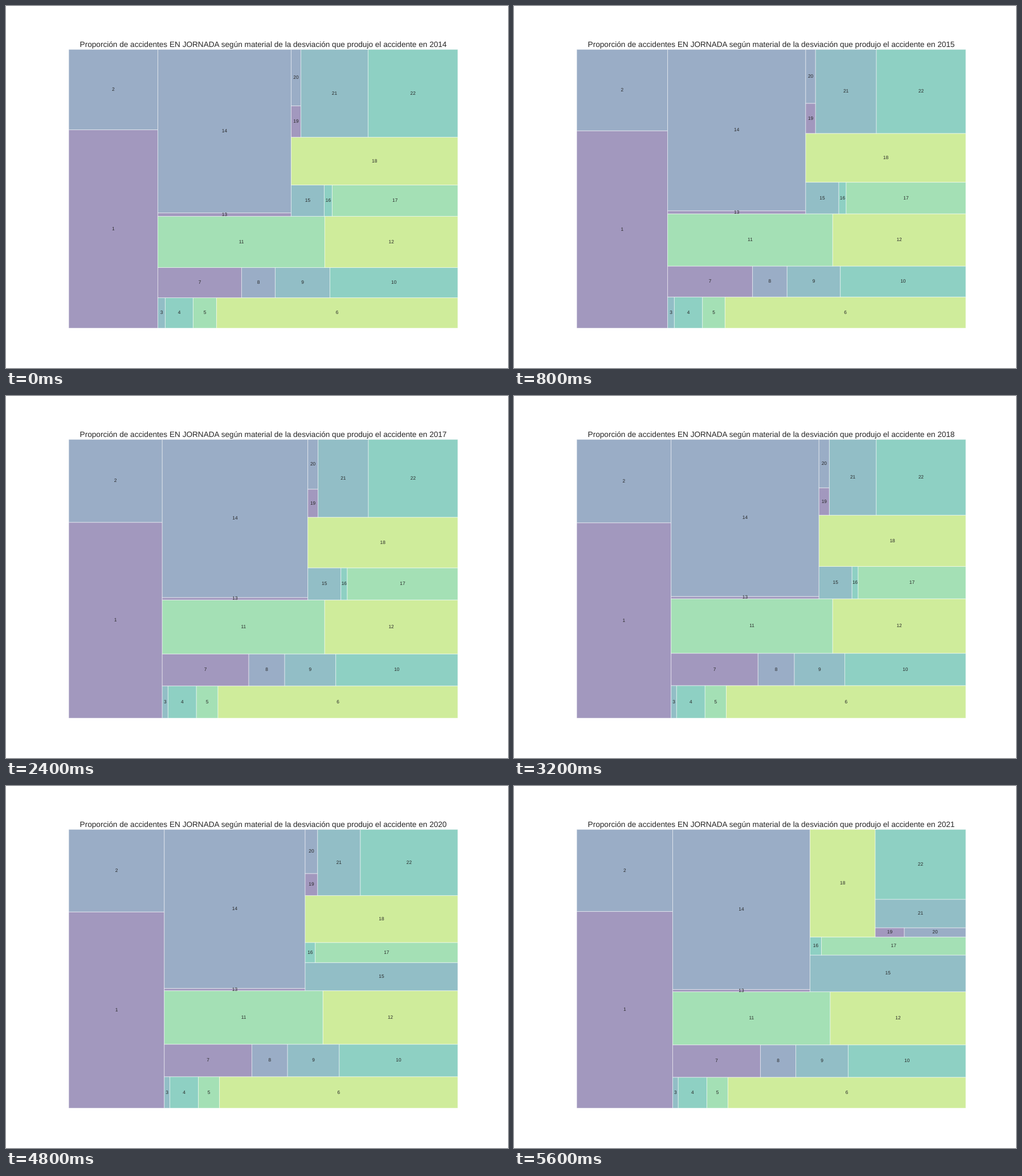
These frames come from a looping animation (881 px wide and 636 px high, 6.4 s). An HTML page:

```html
<!DOCTYPE html>
<html lang="es">
<head>
<meta charset="utf-8">
<title>Accidentes en jornada</title>
<style>
  html, body { margin: 0; width: 100%; height: 100%; overflow: hidden; background: #fff; }
  svg { display: block; }
  rect { fill-opacity: .5; stroke: #fff; stroke-opacity: .5; stroke-width: 1.05px; }
  text {
    font: 8.37px "Liberation Sans", Arial, sans-serif;
    fill: #262626; text-anchor: middle; text-rendering: geometricPrecision;
  }
  .title { font-size: 13.61px; }
  .year { visibility: hidden; animation: show 6.4s step-end infinite; }
  @keyframes show {
    0% { visibility: visible; }
    12.5%, 100% { visibility: hidden; }
  }
</style>
</head>
<body>
<svg id="stage" width="881" height="636" viewBox="0 0 881 636"></svg>
<script>
const COLORS = ['#46327e', '#365c8d', '#277f8e', '#1fa187', '#4ac16d', '#a0da39'];
const PLOT = { left: 110.1, bottom: 566, width: 682.8, height: 489.7 };

// Percent share of each category in three key years
const KEYS = [2014, 2019, 2021];
const SHARES = [
  [16.3, 17.04, 17.4], [6.6, 7.29, 7.26],
  [.208, .163, .159], [.784, .86, .815], [.656, .636, .601], [6.775, 7.226, 6.779],
  [2.33, 2.609, 2.625], [.935, 1.091, 1.057], [1.522, 1.5, 1.568], [3.557, 3.608, 3.518],
  [7.887, 8.126, 7.707], [6.283, 6.708, 6.631],
  [.42, .313, .288], [20.1, 21.5, 20.27],
  [.954, .988, 5.274], [.23, .179, .19], [3.625, 3.183, 2.402], [7.345, 6.906, 6.472],
  [.28, .26, .249], [.504, .459, .526], [5.442, 3.124, 2.376], [7.259, 6.185, 5.831],
];

const sum = list => list.reduce((a, b) => a + b, 0);
const easeOut = t => 1 - (1 - t) ** 1.7;

function sharesIn(year) {
  const k = year < KEYS[1] ? 0 : 1;
  const t = easeOut((year - KEYS[k]) / (KEYS[k + 1] - KEYS[k]));
  return SHARES.map(s => s[k] + (s[k + 1] - s[k]) * t);
}

// Worst aspect ratio of a strip of areas laid along a side
function worst(areas, side) {
  const depth = sum(areas) / side;
  return Math.max(...areas.map(a => Math.max(a / depth ** 2, depth ** 2 / a)));
}

// Squarified treemap of a 100 by 100 square, y pointing up
function squarify(shares) {
  const total = sum(shares);
  const areas = shares.map(s => s / total * 1e4);
  const boxes = [];
  let x = 0, y = 0, dx = 100, dy = 100;
  while (boxes.length < areas.length) {
    const rest = areas.slice(boxes.length);
    const side = Math.min(dx, dy);
    let n = 1;
    while (n < rest.length && worst(rest.slice(0, n), side) >= worst(rest.slice(0, n + 1), side)) n++;
    const strip = rest.slice(0, n);
    const depth = sum(strip) / side;
    const upright = dx >= dy;
    let pos = 0;
    for (const area of strip) {
      const len = area / depth;
      boxes.push(upright ? [x, y + pos, depth, len] : [x + pos, y, len, depth]);
      pos += len;
    }
    if (upright) { x += depth; dx -= depth; }
    else { y += depth; dy -= depth; }
  }
  return boxes;
}

function toPlot([x, y, w, h]) {
  const sx = PLOT.width / 100, sy = PLOT.height / 100;
  return [PLOT.left + x * sx, PLOT.bottom - (y + h) * sy, w * sx, h * sy];
}

function drawYear(year, i) {
  const boxes = squarify(sharesIn(year)).map(toPlot);
  const rects = boxes.map(([x, y, w, h], n) =>
    `<rect x="${x}" y="${y}" width="${w}" height="${h}" fill="${COLORS[n % COLORS.length]}"/>`);
  const labels = boxes.map(([x, y, w, h], n) =>
    `<text x="${x + w / 2}" y="${y + h / 2 + 2.2}">${n + 1}</text>`);
  return `<g class="year" style="animation-delay:${i * 800}ms">${rects.join('')}${labels.join('')}
    <text class="title" x="451.5" y="72.2">Proporción de accidentes EN JORNADA según material de la desviación que produjo el accidente en ${year}</text></g>`;
}

const years = Array.from({ length: 8 }, (_, i) => KEYS[0] + i);
document.getElementById('stage').innerHTML = years.map(drawYear).join('');
</script>
</body>
</html>
```
